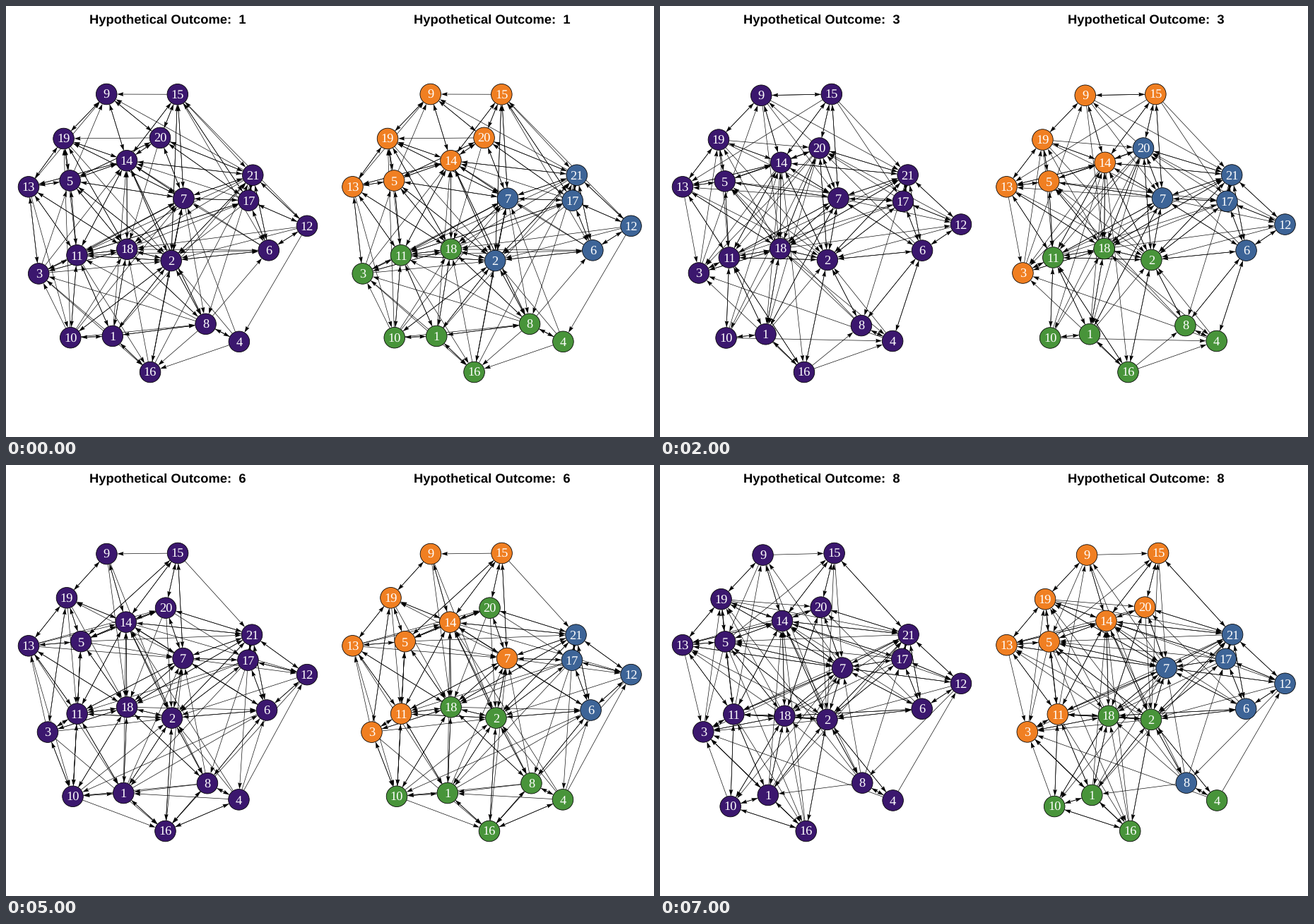
A matplotlib script for the animation above (8000 ms loop, 917 by 611 pixels).

```python
import numpy as np
import matplotlib.pyplot as plt
from matplotlib.animation import FuncAnimation
from matplotlib.collections import LineCollection, PatchCollection, PolyCollection
from matplotlib.patches import Circle

W, H, DPI = 917, 611, 64
PT = 72 / DPI                       # points per pixel
RADIUS, HEAD_LEN, HEAD_HALF = 15, 9, 2.8
PANEL_SHIFT = 458.5
PURPLE, ORANGE, BLUE, GREEN = "#3b176e", "#f07f22", "#3d6497", "#48943a"

# Mean place of nodes 1 to 21; each outcome wobbles around it
LAYOUT = np.array([
    (152, 465), (236, 359), (58, 378), (329, 475), (92, 250), (371, 346), (253, 272),
    (284, 450), (145, 127), (94, 470), (101, 354), (426, 310), (32, 256), (172, 221),
    (245, 125), (205, 519), (343, 275), (172, 343), (85, 189), (225, 203), (349, 239)])
NODES = range(1, len(LAYOUT) + 1)
LOW, HIGH = np.array([32, 125]), np.array([426, 519])

# Nodes that stray far from their mean place, per outcome
STRAYS = {
    1: {3: (-10, 1), 20: (-6, -15)},
    2: {3: (-3, -10), 5: (15, -5), 17: (-2, -11)},
    4: {19: (-8, 11), 20: (8, 7)},
    6: {1: (15, 0), 5: (15, 0), 12: (0, -13), 16: (21, 0)},
    7: {9: (-17, 20), 13: (0, -14)},
    8: {7: (4, 15), 10: (4, 13), 18: (3, 12)},
}

# Steady members of the groups, then those that join for one outcome; the rest are green
ORANGE_CORE, BLUE_CORE = {9, 13, 14, 15, 19}, {6, 12, 17, 21}
JOIN_ORANGE = [{5, 20}, {3, 11}, {3, 5}, {3, 5, 7}, {3, 5, 7},
               {3, 5, 7, 11}, {3, 5, 20}, {3, 5, 11, 20}]
JOIN_BLUE = [{2, 7}, {5, 7, 8, 20}, {7, 20}, {20}, {20}, set(), {7, 11}, {7, 8}]

HUBS = {2, 7, 11, 14, 18, 21}


def layout(num, rng):
    pos = LAYOUT + rng.uniform(-2, 2, LAYOUT.shape)
    for node, shift in STRAYS.get(num, {}).items():
        pos[node - 1] = LAYOUT[node - 1] + shift
    lo, hi = pos.min(axis=0), pos.max(axis=0)
    return LOW + (pos - lo) / (hi - lo) * (HIGH - LOW)


def draw_ties(pos, rng):
    """Near nodes and hubs are likely to be tied; the likeliest ties are always there."""
    ties = []
    for a in NODES:
        for b in NODES:
            if a == b:
                continue
            reach = 120 + 70 * (b in HUBS) + 40 * (a in HUBS)
            dist = np.hypot(*(pos[b - 1] - pos[a - 1]))
            chance = 1 / (1 + np.exp((dist - reach) / 60))
            if rng.random() < chance or chance > 0.6:
                ties.append((a, b))
    return ties


def group_colors(num):
    orange = ORANGE_CORE | JOIN_ORANGE[num - 1]
    blue = BLUE_CORE | JOIN_BLUE[num - 1]
    return [ORANGE if n in orange else BLUE if n in blue else GREEN for n in NODES]


def arrow(a, b):
    """Shaft and head of an arrow between the rims of two nodes."""
    step = (b - a) / np.hypot(*(b - a))
    side = np.array([-step[1], step[0]]) * HEAD_HALF
    tip = b - step * RADIUS
    back = tip - step * HEAD_LEN
    return (a + step * RADIUS, back + step), (tip, back + side, back + step, back - side)


def draw_panel(pos, colors, ties, title, title_x):
    shafts, heads = zip(*(arrow(pos[a - 1], pos[b - 1]) for a, b in ties))
    ax.add_collection(LineCollection(shafts, colors="black", linewidths=0.65 * PT, zorder=1))
    ax.add_collection(PolyCollection(heads, facecolors="black", edgecolors="none", zorder=2))
    ax.add_collection(PatchCollection([Circle(p, RADIUS - 0.2) for p in pos], facecolors=colors,
                                      edgecolors="black", linewidths=0.8 * PT, zorder=3))
    for n, (x, y) in zip(NODES, pos):
        ax.text(x, y + 6.2, str(n), family="Liberation Serif", size=18.4 * PT,
                color="white", ha="center", va="baseline", zorder=4)
    ax.text(title_x, 24, title, family="Liberation Sans", weight="bold",
            size=18.4 * PT, ha="center", va="baseline")


def draw(i):
    num = i + 1
    rng = np.random.default_rng(num)
    pos = layout(num, rng)
    ties = draw_ties(pos, rng)
    title = f"Hypothetical Outcome:  {num}"
    ax.clear()
    ax.set(xlim=(0, W), ylim=(H, 0))
    ax.axis("off")
    draw_panel(pos, [PURPLE] * len(NODES), ties, title, 229)
    draw_panel(pos + [PANEL_SHIFT, 0], group_colors(num), ties, title, 229 + PANEL_SHIFT)
    return []


plt.rcParams["text.hinting"] = "none"
fig = plt.figure(figsize=(W / DPI, H / DPI), dpi=DPI, facecolor="white")
ax = fig.add_axes([0, 0, 1, 1])
anim = FuncAnimation(fig, draw, frames=8, init_func=lambda: [], interval=1000, repeat=True)
plt.show()
```
